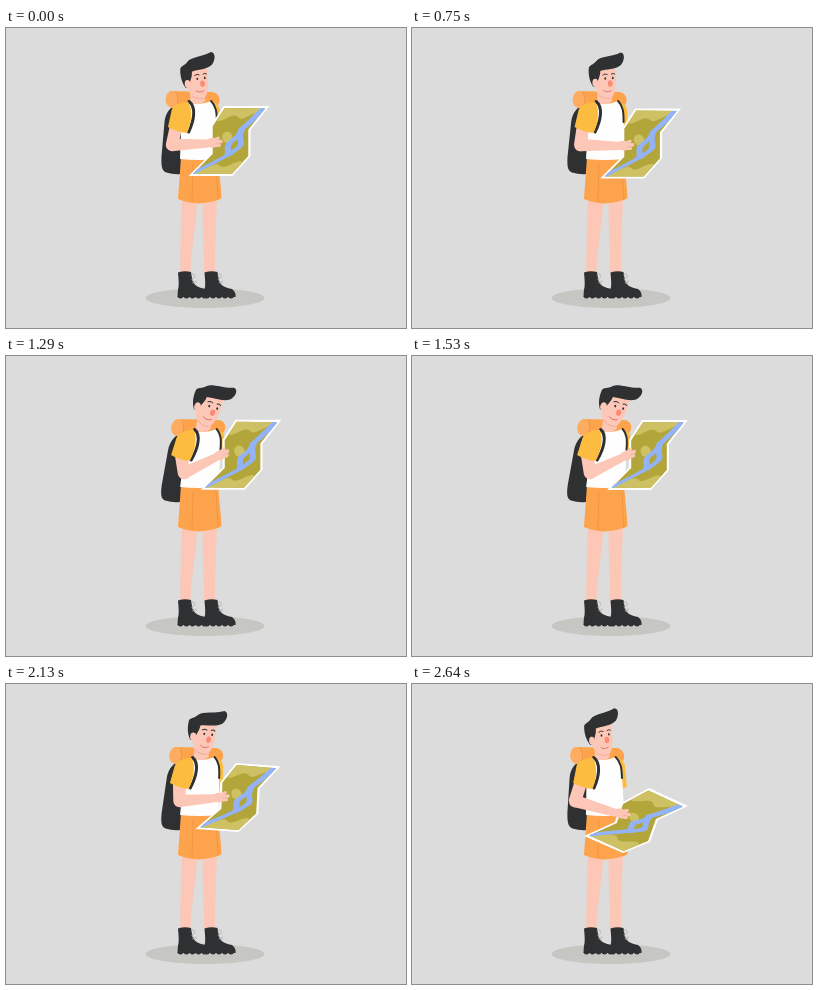
Write an HTML page with a canvas that moves like this. It is 400 by 300 pixels and loops after 2670 ms.

```html
<!DOCTYPE html>
<html lang="en">
<head>
<meta charset="utf-8">
<title>Hiker with a map</title>
<style>
html, body { margin: 0; width: 100%; height: 100%; overflow: hidden; background: #dcdcdc; }
canvas { display: block; width: 400px; height: 300px; }
</style>
</head>
<body>
<canvas id="stage"></canvas>
<script>
const LOOP = 2670, STEP = 30;
const SKIN = '#fcc7b7', INK = '#2f3032', ORANGE = '#fda34c', YELLOW = '#fcbc40', WHITE = '#fefefe';
const canvas = document.getElementById('stage');
const dpr = window.devicePixelRatio || 1;
canvas.width = 400 * dpr;
canvas.height = 300 * dpr;
const ctx = canvas.getContext('2d');

const mix = (a, b, p) => a + (b - a) * p;
const linear = p => p;
const easeIn = p => p * p;
const easeOut = p => 1 - (1 - p) ** 2;
const easeOut3 = p => 1 - (1 - p) ** 3;
const easeInOut = p => p < .5 ? 4 * p ** 3 : 1 - (2 - 2 * p) ** 3 / 2;

// lean: whole upper body, nod: head angle, x and y: map corner, flat: how far the map is laid down
const settle = { lean: -.2, nod: -3, x: 217.5, y: 78, flat: 0 };
const read = { lean: 0, nod: 0, x: 223, y: 81, flat: 0 };
const peer = { lean: 1, nod: 21, x: 228, y: 63, flat: 0 };
const drift = { ...peer, x: 230, y: 64 };
const lower = { lean: .55, nod: 10, x: 230, y: 79, flat: .18 };
const look = { lean: -.5, nod: -5, x: 237, y: 104, flat: 1 };

// time, pose, easing towards that pose
const KEYS = [
  [0, settle],
  [360, read, easeOut3],
  [690, read, linear],
  [1020, peer, easeInOut],
  [1530, drift, easeOut],
  [1860, drift, linear],
  [2130, lower, easeIn],
  [2580, look, easeOut],
  [LOOP, look, linear]
];

function poseAt(t) {
  const i = KEYS.findIndex(k => k[0] > t);
  const [t0, from] = KEYS[i - 1], [t1, to, ease] = KEYS[i];
  const p = ease((t - t0) / (t1 - t0)), pose = {};
  for (const k in from) pose[k] = mix(from[k], to[k], p);
  return pose;
}

function fill(path, color) {
  ctx.fillStyle = color;
  ctx.fill(typeof path === 'string' ? new Path2D(path) : path);
}
function line(path, color, width) {
  ctx.strokeStyle = color;
  ctx.lineWidth = width;
  ctx.stroke(new Path2D(path));
}
function oval(x, y, rx, ry, color) {
  ctx.beginPath();
  ctx.ellipse(x, y, rx, ry, 0, 0, 7);
  ctx.fillStyle = color;
  ctx.fill();
}
function polygon(points) {
  const path = new Path2D();
  points.forEach(p => path.lineTo(...p));
  path.closePath();
  return path;
}
function group(draw) {
  ctx.save();
  draw();
  ctx.restore();
}
const steps = (n, f) => Array.from({ length: n + 1 }, (_, i) => f(i / n));

function drawLegs() {
  fill('M176.500 170 L191.500 170 C190 197 185 222 184.500 246 L174 246 C175 220 174 195 176.500 170Z', SKIN);
  fill('M196.500 170 L211 170 C210 200 209 220 209 246 L198 246 C198 220 196 195 196.500 170Z', SKIN);
  drawBoot(171.5);
  drawBoot(198);
  fill('M175 129 L212 129 C213 143 215 157 215.500 170.500 Q206 174.500 193 175.500 Q181 175 172 171 C173 157 174 143 175 129Z', ORANGE);
  line('M187 137 L186 174 M210 136 L212 172', '#e8933f', .7);
}

function drawBoot(x) {
  group(() => {
    ctx.translate(x, 243);
    fill('M.5 1.500 Q7 -.5 13.500 1 L15 10 C17 15 22 17 28 18 C31 20 32 23 31.500 26 L0 26 L.3 20 C2 14 1 8 .5 1.500Z', INK);
    for (let i = 0; i < 5; i++) oval(3 + i * 6, 25.5, 2.7, 2, INK);
    line('M13.500 4 C18 1 19 6 15 8 M14 8 L18 13 M15 12 L19 10', '#aaaaaa', .7);
  });
}

function drawPack() {
  fill('M178 76 C166 76 160 84 159 95 L155.500 129 C155 139 156 143 160 144.500 Q168 147 175 146 L182 128 L190 80Z', INK);
  fill('M166 63 L207 64 C217 65 217 79 207 80 L166 80Z', ORANGE);
  oval(167, 71.5, 6.5, 8.5, '#fdac60');
  line('M171 64.500 Q175 71 171 78.500', '#ec9143', .8);
}

function drawTorso() {
  fill('M205 74 C211 74 214 77 215 82 L216 103 L209 105Z', YELLOW);
  fill('M183 74 Q193 78 205 73.500 C210 75 211 80 211.500 90 L212.500 131 Q193 133 174 131 L176 95 C177 82 179 76 183 74Z', WHITE);
  line('M206 73 C211 78 211.500 84 211.500 94', INK, 2);
  fill('M186 58 L200 58 L200 73 Q193 79 185 74Z', SKIN);
}

function drawSleeve() {
  line('M184 73.500 C191 79 189 92 183 104', INK, 3);
  fill('M183 74 C175 74 168 77 166.500 82 L162.500 99 Q171 104 181.500 105 C186 96 188 81 183 74Z', YELLOW);
}

function drawHead() {
  fill('M182 40 L203 39 C204 48 204.500 58 202 65 C200 72 192 73 187 68 C183 63 181 52 182 40Z', SKIN);
  line('M187 67.500 Q192 72 199 70', '#f3a796', .8);
  fill('M181 59 C177 53 176 46 176.500 40 C177 37 181 37 184 33 C188 28 200 29 208 24.500 C213 25 212 33 208.500 37 C203 42 194 41 188 43 C188 47 187 49 186 52 L184 58Z', INK);
  oval(183, 55, 2.8, 4, SKIN);
  oval(198, 55.5, 2.3, 3.2, '#fb8a76');
  oval(193, 50.5, .9, 1.2, INK);
  oval(200.5, 50, .9, 1.2, INK);
  line('M190.500 47 Q193 45 195 46.500 M199 46 Q201 44.500 202.500 46', INK, .9);
  line('M191.500 62.500 Q195 65.500 199 62.500', '#d9685c', .8);
}

// Eight corners, clockwise from the top left, relative to that first corner.
const UPRIGHT = [[0, 0], [46, 0], [27, 24], [27, 50], [9, 70], [-35, 70], [-13, 48], [-13, 20]];
const FLAT = [[0, 0], [39, 18], [9, 32], [1, 54], [-26, 65], [-65, 48], [-34, 34], [-28, 15]];

// Places a point of the folded sheet: u runs across, v runs 0..3 over the panels.
function sheet({ x, y, flat }) {
  const corners = UPRIGHT.map(([a, b], i) => [x + mix(a, FLAT[i][0], flat), y + mix(b, FLAT[i][1], flat)]);
  return ([u, v]) => {
    const k = Math.min(2, Math.max(0, Math.floor(v)));
    return [0, 1].map(a => mix(
      mix(corners[(8 - k) % 8][a], corners[7 - k][a], v - k),
      mix(corners[1 + k][a], corners[2 + k][a], v - k), u));
  };
}

const wave = u => .35 * (.5 - u) + .1 * Math.sin(13 * u);
const riverAt = v => .92 - .29 * v + .16 * Math.sin(Math.PI * v / 2.6);
const split = v => .15 * Math.exp(-(((v - 1.62) / .27) ** 2));

function drawMap(pose) {
  const place = sheet(pose);
  const shape = points => polygon(points.map(place));
  const outline = inset => {
    const l = inset * .055, r = 1 - l, v = inset * .1;
    return shape([[l, v], [r, v], [r, 1], [r, 2], [r, 3 - v], [l, 3 - v], [l, 2], [l, 1]]);
  };
  const hill = (edge, base) => shape([[0, base], ...steps(24, u => [u, edge + wave(u)]), [1, base]]);
  const ribbon = side => {
    const bank = sign => steps(36, p => [riverAt(3 * p) + side * split(3 * p) + sign * .075, 3 * p]);
    return shape([...bank(-1), ...bank(1).reverse()]);
  };
  fill(outline(0), WHITE);
  group(() => {
    ctx.clip(outline(1));
    fill(outline(0), '#b2a53a');
    fill(hill(.5, 0), '#cdc164');
    fill(hill(2.5, 3), '#cdc164');
    fill(shape(steps(16, p => [.42 + .13 * Math.cos(p * 2 * Math.PI), 1.36 + .21 * Math.sin(p * 2 * Math.PI)])), '#cdc164');
    fill(ribbon(-1), '#93b3f6');
    fill(ribbon(1), '#93b3f6');
  });
}

// The hand keeps hold of the map's left edge.
function drawArm({ lean, x, y, flat }) {
  const ex = 168 + 10 * lean, ey = 117;
  const wx = x + mix(-15.5, -33, flat) - 4 * Math.max(0, lean), wy = y + mix(37.5, 25, flat);
  const angle = Math.atan2(wy - ey, wx - ex), nx = -Math.sin(angle), ny = Math.cos(angle);
  line(`M${171 + 4 * lean} 98 L${ex} ${ey}`, SKIN, 12.5);
  fill(polygon([[ex + nx * 6.2, ey + ny * 6.2], [wx + nx * 4, wy + ny * 4],
    [wx - nx * 4, wy - ny * 4], [ex - nx * 6.2, ey - ny * 6.2]]), SKIN);
  group(() => {
    ctx.translate(wx, wy);
    ctx.rotate(angle * .8);
    oval(4, -.5, 7, 4.8, SKIN);
    line('M5 -3 L10.500 -5', SKIN, 3);
    line('M7 -1 L13 -1.500 M5 2 L11 2', SKIN, 3.6);
    line('M8 .6 L12 .4', '#eda895', .6);
  });
}

function render(t) {
  const pose = poseAt(t), { lean, nod } = pose;
  const leaning = draw => group(() => {
    const k = -4.5 * lean / 57;
    ctx.transform(1, 0, k, 1, -132 * k, 0);
    draw();
  });
  ctx.setTransform(dpr, 0, 0, dpr, 0, 0);
  ctx.lineCap = ctx.lineJoin = 'round';
  ctx.fillStyle = '#dcdcdc';
  ctx.fillRect(0, 0, 400, 300);
  oval(199, 270, 59.5, 10, '#c6c6c2');
  leaning(drawPack);
  drawLegs();
  leaning(drawTorso);
  group(() => {
    ctx.translate(192 + 4 * lean, 68 - 2 * lean);
    ctx.rotate(nod * Math.PI / 180);
    ctx.scale(1 + .1 * Math.max(0, lean), 1);
    ctx.translate(-192, -68);
    drawHead();
  });
  drawMap(pose);
  drawArm(pose);
  leaning(drawSleeve);
}

const start = performance.now();
function tick() {
  const t = (performance.now() - start) % LOOP;
  render(Math.floor(t / STEP) * STEP);
  requestAnimationFrame(tick);
}
tick();
</script>
</body>
</html>
```
